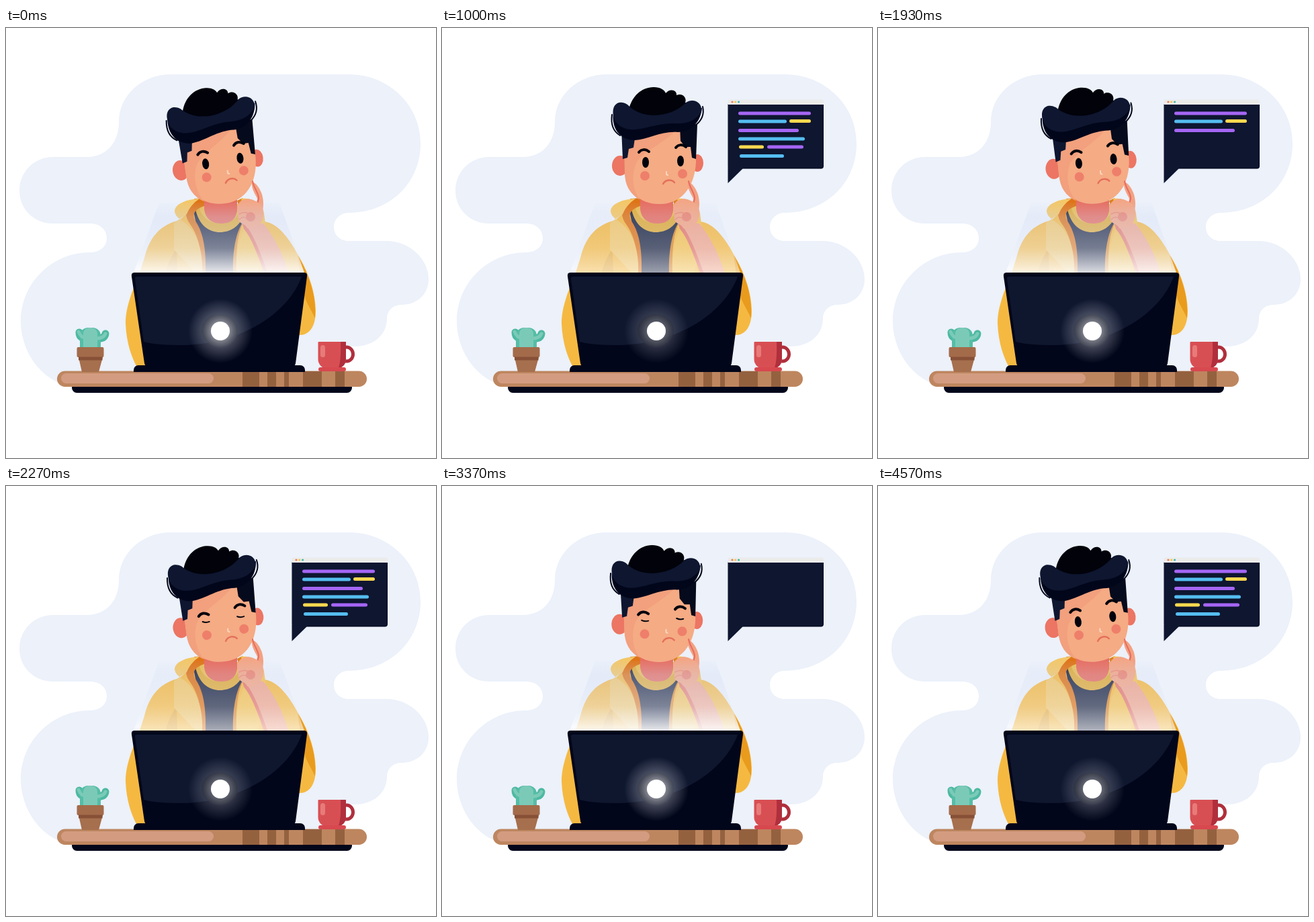
An HTML page with a canvas for the animation above (4.76 s loop, 640 px wide and 640 px high).

```html
<!DOCTYPE html>
<html lang="en">
<head>
<meta charset="utf-8">
<title>Thinking at the laptop</title>
<style>
  html, body { margin: 0; width: 100%; height: 100%; overflow: hidden; background: #fff; }
  canvas { display: block; width: 640px; height: 640px; }
</style>
</head>
<body>
<canvas id="stage" width="640" height="640"></canvas>
<script>
const ctx = document.getElementById('stage').getContext('2d');
const LOOP = 4760, LAST = 4570;
const INK = '#02061a', NAVY = '#0e1630', SKIN = '#f5ab84', EAR = '#ec7563';

const clamp = v => Math.max(0, Math.min(1, v));
const smooth = v => v * v * (3 - 2 * v);

function fill(d, color) {
  ctx.fillStyle = color;
  ctx.fill(new Path2D(d));
}
function stroke(d, color, width) {
  ctx.strokeStyle = color;
  ctx.lineWidth = width;
  ctx.lineCap = 'round';
  ctx.lineJoin = 'round';
  ctx.stroke(new Path2D(d));
}
function box(x0, y0, x1, y1, color, radius = 0) {
  ctx.fillStyle = color;
  ctx.beginPath();
  ctx.roundRect(x0, y0, x1 - x0, y1 - y0, radius);
  ctx.fill();
}
function oval(x, y, rx, ry, color, turn = 0) {
  ctx.fillStyle = color;
  ctx.beginPath();
  ctx.ellipse(x, y, rx, ry, turn, 0, 2 * Math.PI);
  ctx.fill();
}

// Eased interpolation through [time, value] keys
function follow(keys, t) {
  for (let i = 1; i < keys.length; i++) {
    const [t0, a] = keys[i - 1], [t1, b] = keys[i];
    if (t <= t1) return a + (b - a) * smooth(clamp((t - t0) / (t1 - t0)));
  }
  return keys[keys.length - 1][1];
}

const LEAN = [[0, 0], [460, 1], [1000, 1], [2380, 0.08], [3600, 0.95], [4570, 0.12]];
const BLINKS = [1170, 2270, 3370, 4470];

const BARS = [
  [0, 441, 549, 127, '#a566f5'], [1, 441, 513, 139, '#55bdf0'],
  [1, 517, 549, 138.5, '#fcd94f'], [2, 441, 531, 152.5, '#a566f5'],
  [3, 441, 540, 165, '#55bdf0'], [4, 442, 479, 177, '#fcd94f'],
  [4, 484, 538, 177, '#a566f5'], [5, 443, 509, 190.5, '#55bdf0']
];
const TYPING = [{ start: 140, clear: 1440 }, { start: 1600, clear: 3250 }, { start: 3390, clear: 9999 }];
const ROW_TIME = 110;

function drawBackdrop() {
  fill(`M245 69H510C570 69 617 115 617 172C617 230 572 275 510 275
    C497 275 488 285 488 296C488 308 497 317 510 317H566C602 317 629 345 629 374
    C629 396 612 412 588 412C575 412 567 422 567 432C567 456 548 474 518 474H490V528H78
    C40 510 22 470 22 437C22 380 68 334 125 334C140 334 150 325 150 313
    C150 300 140 291 125 291H70C42 291 20 270 20 242C20 214 42 192 70 192H120
    C150 192 168 170 168 140C168 100 203 69 245 69Z`, '#ecf1fa');
}

function drawBody() {
  fill(`M258 286C230 293 214 310 206 342L198 367C184 400 178 420 178 440
    C179 468 187 490 194 503H430V457H437C452 457 461 444 461 420
    C460 394 452 368 437 342C423 316 407 291 384 288L350 262H285Z`, '#f5b942');
  fill('M434 338C454 372 462 402 460 432C452 414 443 405 440 380Z', '#e99b1e');
  fill('M254 328L255 366H237C241 350 247 338 254 328Z', '#e5a93a');
  fill('M374 318L382 366H389L380 325Z', '#e5a93a');

  // Shirt, collar and neck
  fill('M279 268C282 304 298 318 297 366H338C338 338 343 312 354 284L340 275Z', '#1b2440');
  fill('M282 270C288 296 304 304 318 304C334 304 347 295 352 282L347 262H285Z', '#dfab39');
  fill('M286 262H348C349 282 335 291 320 291C304 291 290 283 286 262Z', '#e9bd57');
  fill('M295 246H344V272C342 286 333 291 320 291C306 291 297 284 295 270Z', '#e66e62');

  // Hood with its darker lining
  fill('M281 254L295 253V265C280 270 276 278 283 289C294 306 298 330 297 366H290C292 330 286 309 274 292C262 275 270 260 281 254Z', '#de7418');
  fill('M288 254C266 255 251 263 251 273C253 286 268 286 279 304C290 322 293 343 292 366H284L250 330V290L269 277C274 265 281 259 288 254Z', '#f3c768');
  fill('M344 257L352 253L360 278C346 296 342 320 343 366H338C337 332 342 304 353 288Z', '#d98222');
  fill('M350 254C364 252 383 262 384 276L390 320L374 366H343C342 334 347 310 358 292Z', '#f5c14f');
}

function drawHand() {
  fill('M350 287C366 304 377 337 388 366H421C412 335 398 309 383 291Z', '#f0a58c');
  fill('M350 285C367 302 379 335 390 366H385C374 337 366 313 354 299Z', '#e57668');
  fill('M366 229C373 231 377 238 380 245C383 253 384 263 382 271L372 268L374 254C371 247 365 240 366 229Z', '#f2a283');
  stroke('M367 228C369 239 377 247 376 254L373 266', '#e96c5e', 2);
  fill('M344 267C347 255 358 252 368 256C379 260 385 268 383 280C381 293 369 301 359 298C357 291 346 292 346 284Z', '#f3a686');
  oval(364, 281, 7, 7, '#eb8471');
  stroke('M347 277C354 273 359 274 363 278M347 285C352 280 357 281 359 285', '#eb8975', 1.5);
}

function drawHead(lean, open) {
  ctx.save();
  ctx.translate(318, 248);
  ctx.rotate((lean - 1) * 0.125);
  ctx.translate(-318, -248);

  oval(265, 205, 12, 15, EAR);
  oval(380, 201, 9, 13, EAR);
  fill('M271 150H378V200C376 239 354 262 325 262C296 263 274 244 272 215Z', SKIN);
  fill('M271 150H350C331 172 300 182 289 201C281 219 284 243 295 256C279 247 272 233 272 215Z', '#f2a07d');

  // Sides, crown and fringe
  fill('M267 150L269 195L276 193L278 180L285 178L288 158Z', NAVY);
  fill('M354 145L355 168L362 177H370L372 193L378 195L380 143Z', '#050a1c');
  fill(`M278 122C282 102 297 88 315 88C325 88 331 92 333 97C340 89 350 93 349 100
    C358 96 365 104 362 111C370 112 371 123 364 129L315 146Z`, '#01020a');
  fill(`M255 126C252 150 265 167 287 167C306 166 327 153 351 155
    C371 155 385 140 387 119L320 130Z`, '#02061a');
  fill(`M255 130C252 113 264 106 276 114C298 138 342 133 363 111
    C373 104 388 110 386 124C378 139 363 143 345 142C313 141 289 159 267 147
    C260 143 256 137 255 130Z`, NAVY);
  stroke('M253 129C251 143 255 154 265 160', INK, 2);
  stroke('M388 117C391 130 385 139 377 145', INK, 2);

  const drop = (1 - open) * 6;
  ctx.save();
  ctx.translate(0, drop);
  stroke('M293 185C297 180 303 180 308 184', '#01030d', 4);
  stroke('M348 178C352 173 358 173 363 177', '#01030d', 4);
  ctx.restore();
  for (const [x, y] of [[303, 200], [355, 198]]) {
    if (open > 0.15) oval(x, y, 5, 8 * open, '#01030d');
    else stroke(`M${x - 5} ${y - 0.5}Q${x} ${y + 2} ${x + 5} ${y + 0.5}`, '#01030d', 2);
  }
  oval(302, 220, 7, 7, '#ee7f6a');
  oval(358, 217, 7, 7, '#ee7f6a');
  stroke('M334 214V218L336 219', '#fbd6bd', 2);
  stroke('M329 232C333 225 342 225 346 230', '#e3705b', 2.4);
  ctx.restore();
}

function drawBeam(glow) {
  ctx.save();
  ctx.globalAlpha = 0.6 + 0.4 * glow;
  const light = ctx.createLinearGradient(0, 260, 0, 364);
  light.addColorStop(0, 'rgba(205,216,242,0.04)');
  light.addColorStop(0.2, 'rgba(208,218,243,0.3)');
  light.addColorStop(0.65, 'rgba(232,237,248,0.48)');
  light.addColorStop(1, 'rgba(255,255,255,0.9)');
  fill('M228 260H407L444 364H190Z', light);
  ctx.restore();
}

function drawLaptop(glow) {
  box(190, 502, 445, 512, INK, [7, 7, 0, 0]);
  fill('M191 364H444Q449 364 448 370L431 499Q430 504 426 504H212Q207 504 206 499L187 370Q186 364 191 364Z', INK);
  fill('M195 370H440C422 421 355 470 264 472C240 472 219 471 205 467L192 374Q191 370 195 370Z', '#0f172f');
  oval(318, 450, 27, 24, 'rgba(10,13,28,0.8)');
  const halo = ctx.createRadialGradient(319, 451, 8, 319, 451, 48);
  halo.addColorStop(0, `rgba(255,255,255,${0.4 + 0.25 * glow})`);
  halo.addColorStop(0.45, `rgba(200,204,215,${0.18 + 0.12 * glow})`);
  halo.addColorStop(1, 'rgba(200,204,215,0)');
  oval(319, 451, 48, 48, halo);
  oval(319, 451, 14, 14, '#fff');
}

function drawDesk() {
  box(98, 528, 515, 543, INK, 8);
  box(76, 510.5, 537, 534, '#be865f', 12);
  box(82, 514, 309, 529, '#d39c81', 7.5);
  for (const [a, b] of [[352, 377], [389, 402], [414, 421], [442, 470], [490, 504]])
    box(a, 511, b, 534, '#94613f');
}

function drawCactus() {
  stroke('M109 453C109 461 115 463 122 462', '#4db9a1', 11);
  stroke('M148 455C147 461 142 463 133 462', '#4db9a1', 11);
  box(110, 446, 141, 480, '#55bda6', [12, 12, 0, 0]);
  box(115, 446, 136, 480, '#7bcab7', [9, 9, 0, 0]);
  stroke('M108 452C110 458 113 461 119 461', '#7bcab7', 5);
  stroke('M148 455C146 460 142 462 135 462', '#7bcab7', 5);
  fill('M108 490H144L138 512H113Z', '#a66f4d');
  box(105.5, 475, 145.5, 490, '#a36b4a', 2);
  box(108, 489.5, 143.5, 494.5, '#875037');
}

function drawCup() {
  oval(508, 485, 9, 11, 'rgba(0,0,0,0)');
  ctx.strokeStyle = '#b02f3d';
  ctx.lineWidth = 5;
  ctx.stroke(ellipsePath(507, 485.5, 9.5, 10.5));
  box(464.5, 467, 506, 507, '#d84f53', [1, 1, 14, 14]);
  fill('M498 467H506V493Q506 503 494 507Q499 499 498 467Z', '#b02f3d');
  box(468, 472, 475, 490, '#e77b79', 3.5);
  box(465, 505, 506, 511, '#d7484f', 3);
}
function ellipsePath(x, y, rx, ry) {
  const path = new Path2D();
  path.ellipse(x, y, rx, ry, 0, 0, 2 * Math.PI);
  return path;
}

function drawBubble(t) {
  const grow = clamp((t - 20) / 115);
  if (!grow) return;
  const scale = 1 + 2.2 * (grow - 1) ** 3 + 1.2 * (grow - 1) ** 2;
  ctx.save();
  ctx.translate(426, 230);
  ctx.scale(scale, scale);
  ctx.translate(-426, -230);
  box(425.5, 113, 568, 209.5, '#050b20', [0, 0, 4, 4]);
  box(426, 113, 567, 208, NAVY, [0, 0, 3, 3]);
  fill('M425.5 207H450L425.5 231Z', NAVY);
  box(425.5, 106.5, 568, 114, '#ebebea', [2, 2, 0, 0]);
  ['#ee8055', '#f4c64f', '#43b9b0'].forEach((c, i) => oval(432 + i * 4.8, 110, 1.6, 1.6, c));

  const pass = [...TYPING].reverse().find(p => t >= p.start);
  if (pass) {
    ctx.globalAlpha = 1 - clamp((t - pass.clear) / 60);
    for (const [row, x0, x1, y, color] of BARS) {
      const reach = 439 + 112 * clamp((t - pass.start) / ROW_TIME - row);
      const end = Math.min(x1, reach);
      if (end > x0 + 1) box(x0, y - 2.5, end, y + 2.5, color, 2.5);
    }
  }
  ctx.restore();
}

function render(t) {
  const glow = 0.5 + 0.5 * Math.cos(2 * Math.PI * t / 1700);
  const open = Math.min(...BLINKS.map(b => clamp((Math.abs(t - b) - 35) / 55)));
  ctx.fillStyle = '#fff';
  ctx.fillRect(0, 0, 640, 640);
  drawBackdrop();
  drawBody();
  drawHead(follow(LEAN, t), open);
  drawHand();
  drawBeam(glow);
  drawDesk();
  drawLaptop(glow);
  drawCactus();
  drawCup();
  drawBubble(t);
}

function tick() {
  render(Math.min(performance.now() % LOOP, LAST));
  requestAnimationFrame(tick);
}
tick();
</script>
</body>
</html>
```
